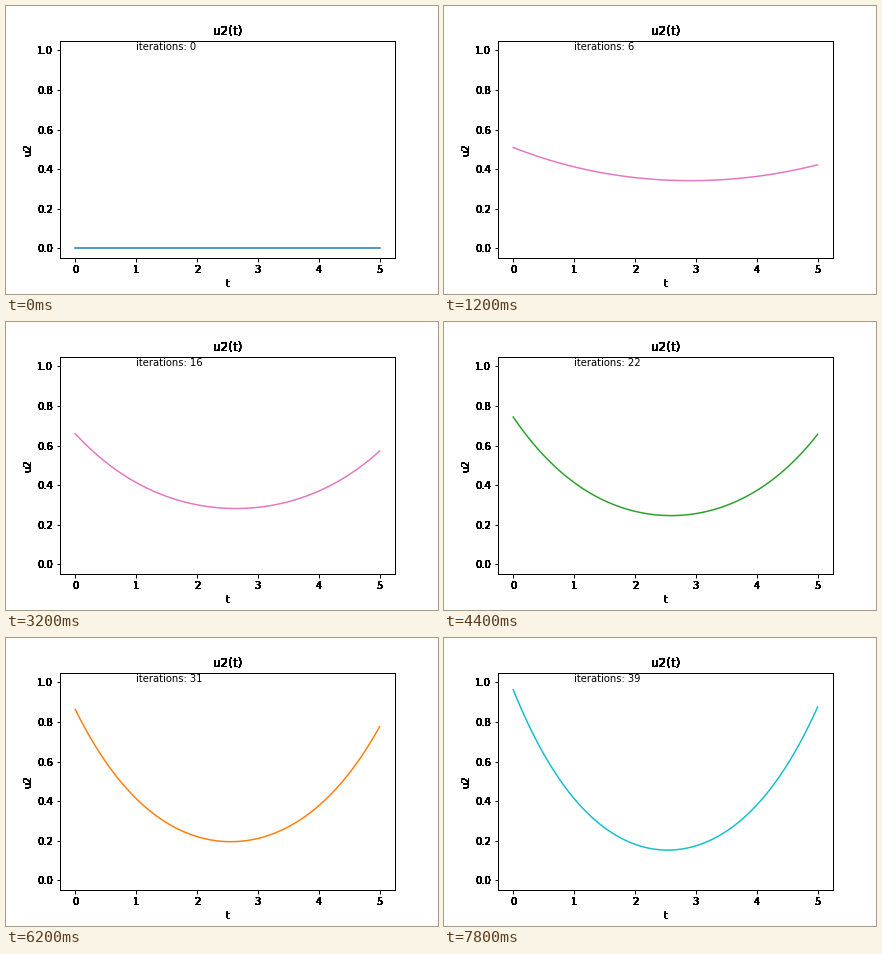
Recreate the animation shown at these times as a matplotlib script. Size 432x288 px, loop 8 s.

```python
import numpy as np
import matplotlib.pyplot as plt
from matplotlib.animation import FuncAnimation

FRAMES = 40
STEP_MS = 200
OVERPRINTS = 24

plt.rcParams["font.family"] = "DejaVu Sans"

t = np.linspace(0, 5, 101)
s = t / 2.5 - 1

# Early shape of the control, and the slow correction added to it
base = 0.346 + 0.117 * s**2 + 0.004 * s**4 - 0.0385 * s - 0.0055 * s**3
drift = -0.194 + 0.511 * s**2 + 0.1355 * s**4 + 0.02 * s * (1 - s**2)


def progress(k):
    x = (k - 6) / 33
    return x + 0.122 * x * (1 - x)


def control(k):
    """Iterate k: a fast rise from zero, then a slow deepening."""
    start = base + drift * progress(0)
    return base + drift * progress(k) - start * 0.4**k


def overprint(artist):
    """Draw the artist repeatedly so its soft edges darken."""
    draw_once = artist.draw

    def draw(renderer):
        for _ in range(OVERPRINTS):
            draw_once(renderer)

    artist.draw = draw


fig = plt.figure(figsize=(6, 4), dpi=72, facecolor="white")
ax = fig.add_axes([0.125, 0.125, 0.775, 0.755])
ax.set_xlim(-0.25, 5.25)
ax.set_ylim(-0.05, 1.05)
ax.set_xticks(range(6))
ax.set_yticks(np.arange(6) / 5)
ax.tick_params(width=1)
ax.set_title("u2(t)", fontsize=12)
ax.set_xlabel("t")
ax.set_ylabel("u2")
for spine in ax.spines.values():
    spine.set_linewidth(1)

labels = [ax.title, ax.xaxis.label, ax.yaxis.label]
for text in labels + ax.get_xticklabels() + ax.get_yticklabels():
    overprint(text)

curve, = ax.plot(t, control(0), lw=1.5)
counter = ax.text(1, 1, "iterations: 0", fontsize=10)


def update(k):
    curve.set_ydata(control(k))
    curve.set_color(f"C{k % 10}")
    counter.set_text(f"iterations: {k}")
    return curve, counter


anim = FuncAnimation(fig, update, frames=FRAMES, interval=STEP_MS,
                     init_func=lambda: update(0), repeat=True, repeat_delay=0)
plt.show()
```
